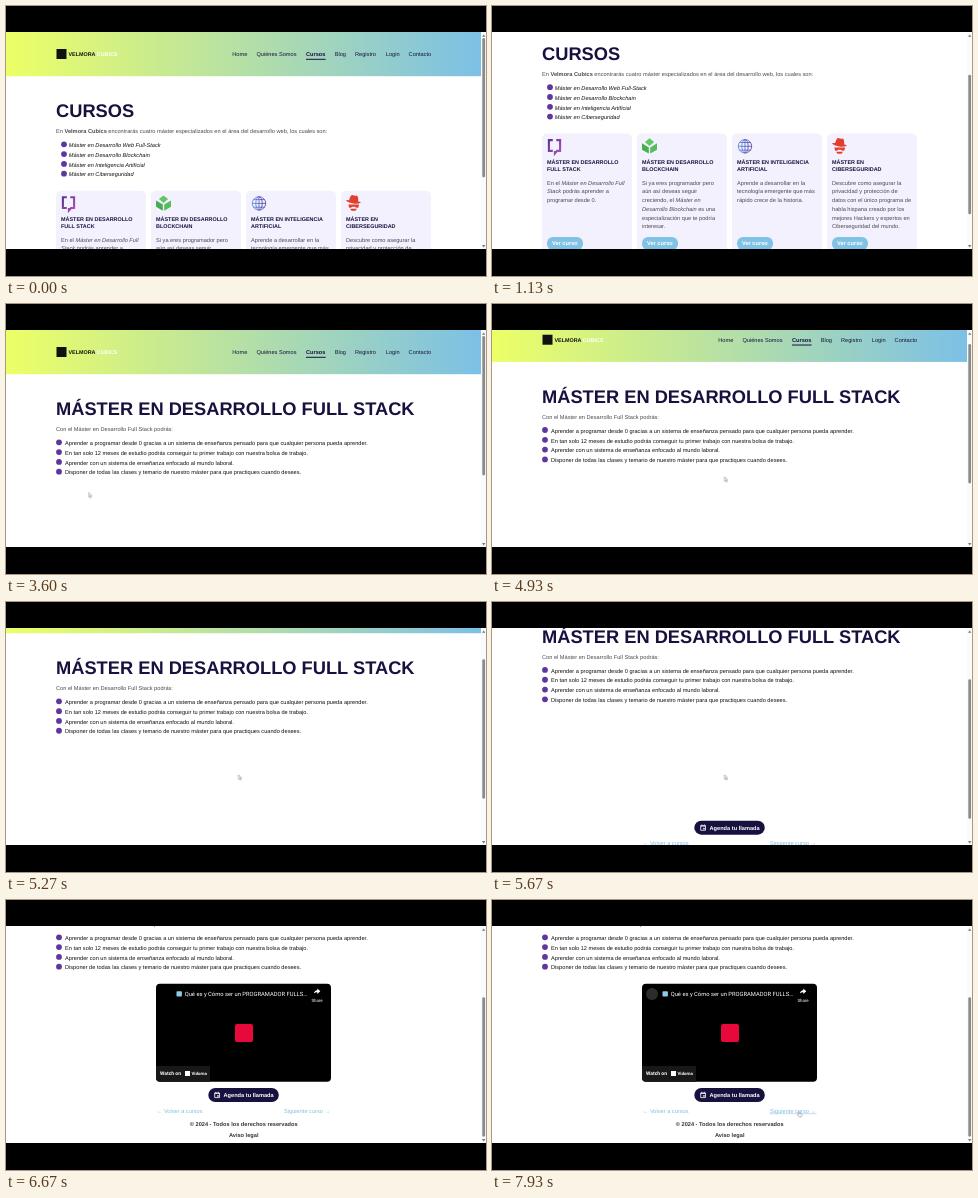
Animation of 480x270 px, one loop 8000 ms. Source, as an HTML page:

```html
<!DOCTYPE html>
<html lang="es">
<head>
<meta charset="utf-8">
<title>Cursos</title>
<style>
@property --scroll { syntax: "<number>"; inherits: true; initial-value: 0; }
html, body { margin: 0; width: 100%; height: 100%; overflow: hidden; background: #000; }
svg { display: block; width: 100vw; height: 100vh; animation: scroll 8s linear infinite; }
text { font: 5.65px "Liberation Sans", Arial, sans-serif; text-rendering: geometricPrecision; fill: #18133f; white-space: pre; }
.title { font-size: 18.27px; font-weight: bold; fill: #17113f; }
.head { font-size: 5.45px; font-weight: bold; fill: #17113f; }
.body { fill: #4b4a55; }
.item { font-size: 5.63px; fill: #111; }
.b { font-weight: bold; }
.i { font-style: italic; }
.w { fill: #fff; }
.mid { text-anchor: middle; }
.foot { font-weight: bold; fill: #35343c; text-anchor: middle; }
.link { fill: #83bde0; }
.player text { font-family: Roboto, Arial, sans-serif; fill: #fff; }

.page { transform: translateY(calc(var(--scroll) * -1px)); }
.thumb { transform: translateY(calc(var(--scroll) * .645px)); }
#courses { animation: leave 8s step-end infinite; }
#detail { animation: enter 8s step-end infinite; }
.player { animation: load 8s step-end infinite; }
.avatar { animation: avatar 8s step-end infinite; }
.hover { animation: hover 8s step-end infinite; }
.cursor { animation: move 8s linear infinite; }
.arrow { animation: arrow 8s step-end infinite; }
.hand { animation: hand 8s step-end infinite; }

@keyframes scroll {
  0%, .6% { --scroll: 0; }
  14.125% { --scroll: 57; }
  21.6%, 44.12% { --scroll: 104; }
  44.125%, 60.2% { --scroll: 0; }
  61.625% { --scroll: 12.2; }
  70.875% { --scroll: 70.3; }
  76.6%, 78.2% { --scroll: 86; }
  80.5%, 100% { --scroll: 101; }
}
@keyframes leave { 0% { opacity: 1; } 44.125%, 100% { opacity: 0; } }
@keyframes enter { 0% { opacity: 0; } 44.125%, 100% { opacity: 1; } }
@keyframes load { 0% { opacity: 0; } 78.375%, 100% { opacity: 1; } }
@keyframes avatar { 0% { opacity: 0; } 89.125%, 100% { opacity: 1; } }
@keyframes hover { 0% { opacity: 0; } 95%, 100% { opacity: 1; } }
@keyframes move {
  0%, 22.5% { transform: translate(136px, 182px); }
  25.5%, 28% { transform: translate(129px, 180.5px); }
  36%, 54% { transform: translate(82.5px, 188.5px); }
  55.875%, 89% { transform: translate(232.5px, 172.8px); }
  95.5%, 100% { transform: translate(306.5px, 211px); }
}
@keyframes arrow {
  0% { opacity: 0; } 22.5% { opacity: 1; } 35.5% { opacity: 0; }
  44.125% { opacity: 1; } 78.375% { opacity: 0; }
  89.125% { opacity: 1; } 95%, 100% { opacity: 0; }
}
@keyframes hand {
  0% { opacity: 0; } 35.5% { opacity: 1; } 44.125% { opacity: 0; }
  95%, 100% { opacity: 1; }
}
</style>
</head>
<body>
<svg viewBox="0 0 480 270">
  <defs>
    <linearGradient id="sky"><stop stop-color="#edff66"/><stop offset="1" stop-color="#7cc0e6"/></linearGradient>
    <linearGradient id="violet" x2="1" y2="1"><stop stop-color="#5a3590"/><stop offset="1" stop-color="#b04fc0"/></linearGradient>
    <linearGradient id="globe"><stop stop-color="#4f86d8"/><stop offset="1" stop-color="#56389c"/></linearGradient>
  </defs>
  <rect width="480" height="270" fill="#fff"/>
  <g id="courses"><g class="page"></g></g>
  <g id="detail"><g class="page"></g></g>

  <rect x="475" y="26" width="5" height="217" fill="#fafafa"/>
  <path d="M476 30.8h3.4l-1.7-2.4zM476 239h3.4l-1.7 2.4z" fill="#777"/>
  <rect class="thumb" x="476.3" y="32" width="2.8" height="139.5" rx="1.4" fill="#8a8a8a"/>

  <g class="cursor" fill="#fff" stroke="#666" stroke-width=".45" stroke-linejoin="round">
    <path class="arrow" d="M0 0v4.4l1-.9.8 1.7.8-.4-.8-1.6h1.4z"/>
    <path class="hand" d="M0 .5q.5-.6.9 0v2l2 .5q.7.3.5 1l-.5 1.9h-2.2l-1.6-2.1q0-.6.9-.1z"/>
  </g>
  <path d="M0 0h480v26H0zM0 243h480v27H0z"/>
</svg>
<script>
const text = (x, y, str, cls = "") => `<text x="${x}" y="${y}" class="${cls}">${str}</text>`;
const italic = str => `<tspan class="i">${str}</tspan>`;
const footer = y =>
  text(237.7, y, "© 2024 - Todos los derechos reservados", "foot") +
  text(237.7, y + 10.7, "Aviso legal", "foot");

const nav = [[226.3, "Home"], [250.4, "Quiénes Somos"], [300, "Cursos"], [328.7, "Blog"],
  [349, "Registro"], [379.8, "Login"], [402.6, "Contacto"]];
const header = `<rect y="26" width="475" height="44.2" fill="url(#sky)"/>
  <rect x="50.5" y="43" width="10" height="10" fill="#111"/>
  <text x="62.5" y="50.2" class="b" style="font-size:5.4px;fill:#111">VELMORA <tspan class="w">CUBICS</tspan></text>
  ${nav.map(([x, s]) => text(x, 50, s, s === "Cursos" ? "b" : "")).join("")}
  <rect x="300" y="52.8" width="19.6" height="1" fill="#17113f"/>`;

const list = (x, gap, cls, items) => items.map((s, i) => {
  const y = 139 + i * 9.8;
  return `<circle cx="${x}" cy="${y - .7}" r="2.9" fill="#5f35a0"/>` + text(x + gap, y + 2, s, cls);
}).join("");

const icons = {
  code: `<path d="M10.8 5.8H6.9v10.8h3.9M14.3 5.8h3.8v10.8h-3l-2.2 2.5v-2.5" fill="none" stroke="url(#violet)" stroke-width="2.1"/>`,
  cubes: `<path d="M12.5 4l4.6 3.6-4.6 4-4.6-4z" fill="#63c665"/><path d="M5 9l6.8 4.1v6.2L5 15.4z" fill="#45ae50"/>
    <path d="M20 9l-6.8 4.1v6.2l6.8-3.9z" fill="#56bd5b"/>`,
  globe: `<g fill="none" stroke="url(#globe)" stroke-width=".8"><circle cx="13" cy="12" r="6.7"/>
    <ellipse cx="13" cy="12" rx="3.2" ry="6.7"/><path d="M6.3 12h13.4M7.4 8.2h11.2M7.4 15.8h11.2M13 5.3l.01 13.4"/></g>`,
  hat: `<g fill="#e2402f"><path transform="rotate(8 12.5 10)" d="M8 9.4q.6-5.6 2.6-5.6 2 1 4 0 2 0 2.6 5.6 2.8 0 2.8 1-3 1.8-7.5 1.8T5 10.4q0-1 3-1z"/>
    <path d="M7.4 13.2h10.6l-.6 3q-2 .8-3.6-.8h-2.4q-1.6 1.6-3.4.8zM9 17.4h7l-1.5 2h-4z"/></g>`
};
const cards = [
  ["code", ["MÁSTER EN DESARROLLO", "FULL STACK"],
    ["En el " + italic("Máster en Desarrollo Full"), italic("Stack") + " podrás aprender a", "programar desde 0."]],
  ["cubes", ["MÁSTER EN DESARROLLO", "BLOCKCHAIN"],
    ["Si ya eres programador pero", "aún así deseas seguir", "creciendo, el " + italic("Máster en"),
      italic("Desarrollo Blockchain") + " es una", "especialización que te podría", "interesar."]],
  ["globe", ["MÁSTER EN INTELIGENCIA", "ARTIFICIAL"],
    ["Aprende a desarrollar en la", "tecnología emergente que más", "rápido crece de la historia."]],
  ["hat", ["MÁSTER EN", "CIBERSEGURIDAD"],
    ["Descubre como asegurar la", "privacidad y protección de", "datos con el único programa de",
      "habla hispana creado por los", "mejores Hackers y expertos en", "Ciberseguridad del mundo."]]
];
const card = ([icon, head, body], i) => `<g transform="translate(${50 + i * 95} 184.7)">
  <rect width="90" height="121.5" rx="5" fill="#f2f1fd"/><g transform="translate(0 .7)">${icons[icon]}</g>
  ${head.map((s, n) => text(5, 30 + n * 7.2, s, "head")).join("")}
  ${body.map((s, n) => text(5, 51.1 + n * 8.7, s, "body")).join("")}
  <rect x="5" y="103.3" width="36" height="13" rx="6" fill="#82c3e5"/>${text(10, 111.8, "Ver curso", "b w")}</g>`;

const player = `<g class="player"><rect x="150" y="184.8" width="175" height="98" rx="4"/>
  <circle class="avatar" cx="160" cy="195" r="6" fill="#2c2c2c"/>
  <rect x="170.5" y="192.2" width="5.4" height="5.4" rx=".8" fill="#8fc9e8"/>
  <text x="178.7" y="197" style="font-size:5.8px">Qué es y Cómo ser un PROGRAMADOR FULLS…</text>
  <path d="M308 194.4q.4-2.9 3.3-3.1v-1.7l3 2.7-3 2.7v-1.7q-2-.1-3.3 1.1z" fill="#fff"/>
  <text x="311" y="202.5" class="mid" style="font-size:4.4px">Share</text>
  <rect x="229" y="225" width="18" height="18" rx="2" fill="#e8093c"/>
  <path d="M150 267h54v15.8h-50q-4 0-4-4z" fill="#181818"/>
  <text x="154" y="276.3" class="b" style="font-size:5px">Watch on</text>
  <rect x="179" y="272" width="5" height="5" fill="#fff"/>
  <text x="185.5" y="276.3" class="b" style="font-size:4.4px">Vidorna</text></g>`;

document.querySelector("#courses .page").innerHTML = header +
  text(50, 110.7, "CURSOS", "title") +
  text(50, 127, `En <tspan class="b">Velmora Cubics</tspan> encontrarás cuatro máster especializados en el área del desarrollo web, los cuales son:`, "body") +
  list(58, 4.8, "item i", ["Máster en Desarrollo Web Full-Stack", "Máster en Desarrollo Blockchain",
    "Máster en Inteligencia Artificial", "Máster en Ciberseguridad"]) +
  cards.map(card).join("") + footer(329.7);

document.querySelector("#detail .page").innerHTML = `<rect y="26" width="475" height="345" fill="#fff"/>` + header +
  text(50, 111, "MÁSTER EN DESARROLLO FULL STACK", "title") +
  text(50, 127, "Con el Máster en Desarrollo Full Stack podrás:", "body") +
  list(53, 6, "item", [
    "Aprender a programar desde 0 gracias a un sistema de enseñanza pensado para que cualquier persona pueda aprender.",
    "En tan solo 12 meses de estudio podrás conseguir tu primer trabajo con nuestra bolsa de trabajo.",
    "Aprender con un sistema de enseñanza enfocado al mundo laboral.",
    "Disponer de todas las clases y temario de nuestro máster para que practiques cuando desees."]) +
  player +
  `<rect x="202.3" y="289" width="70.5" height="14" rx="7" fill="#16113f"/>
  <path d="M208.7 294h4.8v4.6h-4.8zM208.7 294.4h4.8M209.8 292.8v1M212.4 292.8v1" fill="none" stroke="#fff" stroke-width=".8"/>
  <rect x="211.2" y="296.2" width="1.5" height="1.5" fill="#fff"/>` +
  text(217.5, 298, "Agenda tu llamada", "b w") +
  text(150.7, 313.8, "← Volver a cursos", "link") +
  text(278, 313.8, "Siguiente curso →", "link") +
  `<rect class="hover" x="278" y="314.6" width="46.5" height=".5" fill="#83bde0"/>` + footer(327);
</script>
</body>
</html>
```
